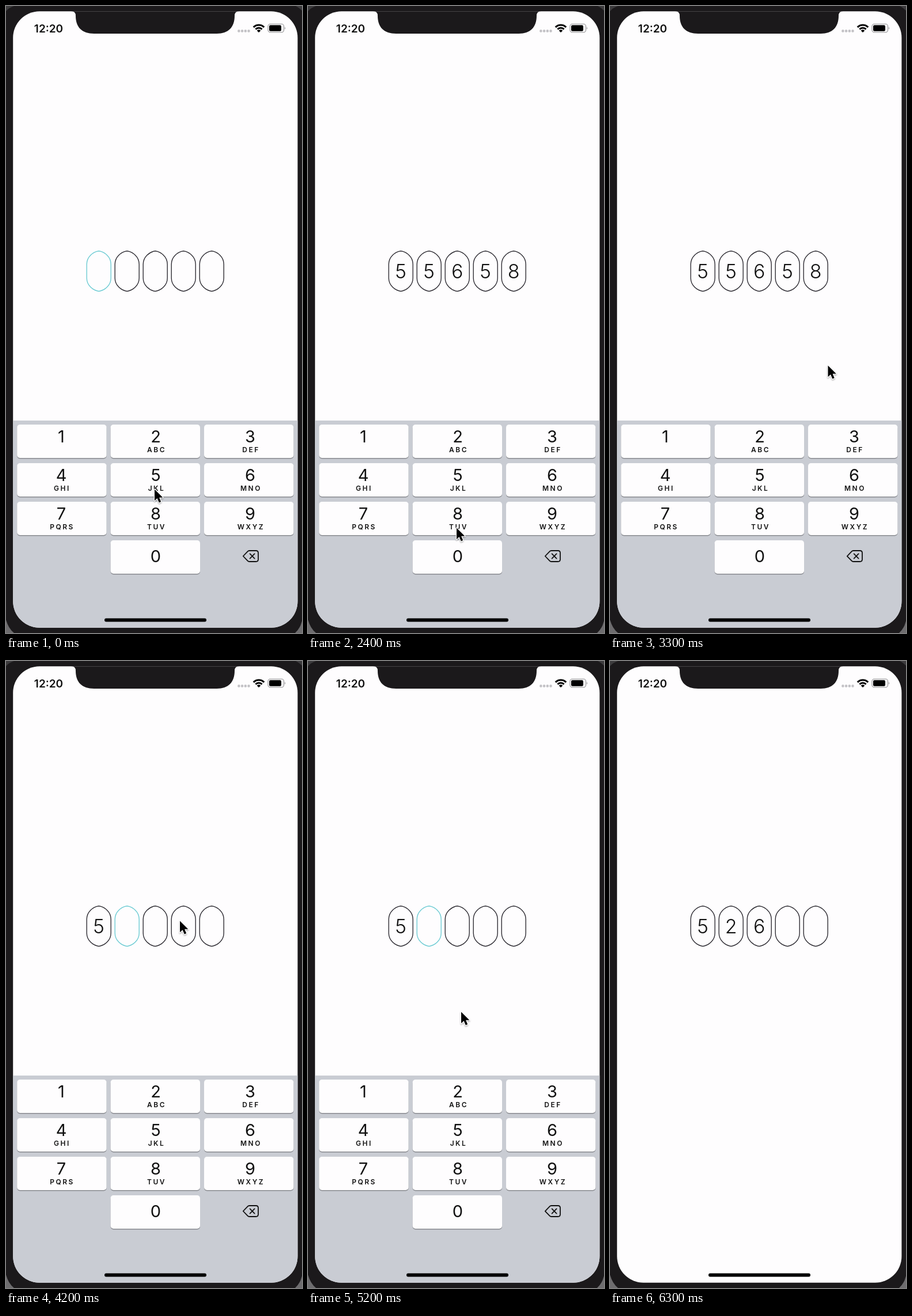
An HTML page for the animation above (6800 ms loop, 514 by 1089 pixels).

```html
<!DOCTYPE html>
<html lang="en">
<head>
<meta charset="utf-8">
<title>Code entry</title>
<style>
  html, body { margin: 0; width: 100%; height: 100%; overflow: hidden; background: #1b191b; }
  svg { display: block; width: 514px; height: 1089px; }
  text { font-family: Inter, Roboto, sans-serif; fill: #111; text-anchor: middle; }
  .cell path { fill: none; stroke: #2e2c33; stroke-width: 1.4; }
  .cell.on path { stroke: #6ccbd3; }
  .cell text { font-size: 34px; font-weight: 300; }
  .num { font-size: 29px; font-weight: 400; }
  .abc { font-size: 12px; font-weight: 600; letter-spacing: 2.5px; }
</style>
</head>
<body>
<svg viewBox="0 0 514 1089">
  <defs>
    <clipPath id="screen"><rect x="12.2" y="9.2" width="494.2" height="1070.6" rx="46"/></clipPath>
    <filter id="soft" x="-50%" y="-50%" width="200%" height="200%">
      <feDropShadow dx="0" dy="1.5" stdDeviation="1.2" flood-opacity=".35"/>
    </filter>
  </defs>
  <rect width="514" height="1089" fill="#1b191b"/>
  <path d="M0 0H14Q5 3 0 9ZM514 0H503Q509 3 514 8Z" fill="#3c3b3d"/>
  <path d="M0 1066Q4 1081 14 1089H0ZM514 1068Q511 1081 502 1089H514Z" fill="#6d6c6e"/>
  <g clip-path="url(#screen)">
    <rect width="514" height="1089" fill="#fefdfe"/>
    <g id="cells"></g>
    <g id="board">
      <rect x="12" y="720" width="495" height="370" fill="#c9ccd3"/>
      <g id="keys"></g>
      <g fill="none" stroke="#111" stroke-width="1.8" stroke-linejoin="round" stroke-linecap="round">
        <path d="M411.8 955.5L419.6 947.3Q420.8 946 422.6 946H434Q438 946 438 950V961Q438 965 434 965H422.6Q420.8 965 419.6 963.7Z"/>
        <path d="M423.6 951.4L431.6 959.6M431.6 951.4L423.6 959.6"/>
      </g>
    </g>
    <path d="M113 9Q121 9 121 17C121 37 132 48 153 48H366C386 48 397 37 397 17Q397 9 405 9Z" fill="#1b191b"/>
    <rect x="171" y="1063.5" width="177" height="6" rx="3"/>
  </g>
  <text x="74" y="45.6" font-size="19" font-weight="600">12:20</text>
  <path d="M404.4 43.4H422" stroke="#c3c2c6" stroke-width="4.6" stroke-linecap="round" stroke-dasharray="0 5.7"/>
  <g fill="none" stroke="#000">
    <path d="M429.8 36.8A13 13 0 0 1 448.2 36.8" stroke-width="3.2"/>
    <path d="M433.4 40.4A7.9 7.9 0 0 1 444.6 40.4" stroke-width="3"/>
    <path d="M439 46L435.7 42.7A4.6 4.6 0 0 1 442.3 42.7Z" fill="#000" stroke="none"/>
  </g>
  <rect x="455" y="31.3" width="27.5" height="14.4" rx="4" fill="none" stroke="#8f8e91" stroke-width="1.1"/>
  <rect x="457" y="33.3" width="21" height="10.4" rx="2.2"/>
  <path d="M484 36.2Q486.2 38.5 484 40.8Z" fill="#8f8e91"/>
  <g id="cursor" filter="url(#soft)">
    <path transform="translate(1 1.5) scale(.93)" d="M0 0V21.2L4.9 16.6L8.4 24.6L12 23L8.7 15.2H15.4Z" stroke="#fff" stroke-width="2.6" stroke-linejoin="round" paint-order="stroke"/>
  </g>
</svg>
<script>
const LOOP = 6800, STEP = 100, TRAVEL = 200, HIDDEN = 360, RATE = 0.037;
const $ = id => document.getElementById(id);

function add(parent, tag, attrs, content = '') {
  const node = document.createElementNS('http://www.w3.org/2000/svg', tag);
  for (const name in attrs) node.setAttribute(name, attrs[name]);
  node.textContent = content;
  return parent.appendChild(node);
}

const cells = Array.from({ length: 5 }, (_, i) => {
  const group = add($('cells'), 'g', { class: 'cell', transform: `translate(${161.2 + 49 * i} 460.5)` });
  add(group, 'path', { d: 'M-21-12C-21-25-10-33.6 0-35C10-33.6 21-25 21-12V12C21 25 10 33.6 0 35C-10 33.6-21 25-21 12Z' });
  return { group, digit: add(group, 'text', { y: 12.5 }) };
});

const keys = {};
function addKey(digit, col, row, abc) {
  const x = 19.2 + 162.4 * col, y = 727 + 67 * row, mid = 96 + 164 * col;
  const size = { x, width: 155.4, height: 58, rx: 5 };
  add($('keys'), 'rect', { ...size, y: y + 1.4, fill: '#898b90' });
  const face = add($('keys'), 'rect', { ...size, y });
  add($('keys'), 'text', { class: 'num', x: mid, y: y + (digit ? 30.8 : 38.3) }, digit);
  add($('keys'), 'text', { class: 'abc', x: mid + 1.5, y: y + 48.4 }, abc);
  keys[digit] = { face, col, row };
}
['', 'ABC', 'DEF', 'GHI', 'JKL', 'MNO', 'PQRS', 'TUV', 'WXYZ']
  .forEach((abc, i) => addKey(i + 1, i % 3, Math.floor(i / 3), abc));
addKey(0, 1, 3, '');

// The session: the pointer reaches each stop at its time, taps type digits.
const stops = [], edits = [];
const glide = (time, x, y) => stops.push({ time, x, y });
const erase = time => edits.push({ time });

function tap(time, digit) {
  const { col, row } = keys[digit];
  glide(time, 147 + 110 * col, 771 + 67 * row);
  edits.push({ time, digit });
}

glide(0, 257, 838);
[...'5566'].forEach((digit, i) => tap(200 * (i + 1), digit));
tap(1200, 4);
glide(1400, 388, 955);
glide(1700, 419, 952);
erase(1700);
erase(1800);
tap(2100, 5);
tap(2300, 8);
glide(2700, 342, 457);
glide(3400, 413, 789);
for (let i = 0; i < 3; i++) erase(3600 + 100 * i);
glide(3800, 370, 610);
erase(4000);
glide(4200, 301, 450);
glide(4500, 300, 376);
glide(4900, 273, 445);
tap(5300, 2);
tap(5500, 6);
glide(5700, 413, 636);
glide(6300, 450, 1110);

// The keyboard hides and returns in turn at these times.
const toggles = [2480, 2948, 4380, 4870, 5770];

function boardAt(t) {
  const past = toggles.filter(time => time <= t);
  const up = past.length % 2 === 0;
  const phase = past.length ? (t - past.at(-1)) * RATE : Infinity;
  const rest = past.length ? (1 + phase) * Math.exp(-phase) : 0;
  return { up, offset: HIDDEN * (up ? rest : 1 - rest) };
}

function cursorAt(t) {
  const next = stops.findIndex(stop => stop.time > t);
  const from = stops.at(next < 0 ? -1 : next - 1), to = stops.at(next);
  const p = Math.max(0, 1 - (to.time - t) / TRAVEL), k = p * p * (3 - 2 * p);
  return [from.x + (to.x - from.x) * k, from.y + (to.y - from.y) * k];
}

const codeAt = t => edits.filter(edit => edit.time <= t)
  .reduce((code, { digit }) => digit ? code + digit : code.slice(0, -1), '');

function draw(time) {
  const t = Math.floor(time / STEP) * STEP;
  const code = codeAt(t), board = boardAt(t);
  cells.forEach(({ group, digit }, i) => {
    digit.textContent = code[i] || '';
    group.classList.toggle('on', board.up && i === code.length);
  });
  const pressed = edits.find(edit => edit.time === t)?.digit;
  for (const digit in keys) {
    keys[digit].face.setAttribute('fill', digit === String(pressed) ? '#b9bdc6' : '#fefdfe');
  }
  $('board').setAttribute('transform', `translate(0 ${board.offset})`);
  $('cursor').setAttribute('transform', `translate(${cursorAt(t)})`);
}

const began = performance.now();
function tick() {
  draw((performance.now() - began) % LOOP);
  requestAnimationFrame(tick);
}
tick();
</script>
</body>
</html>
```
